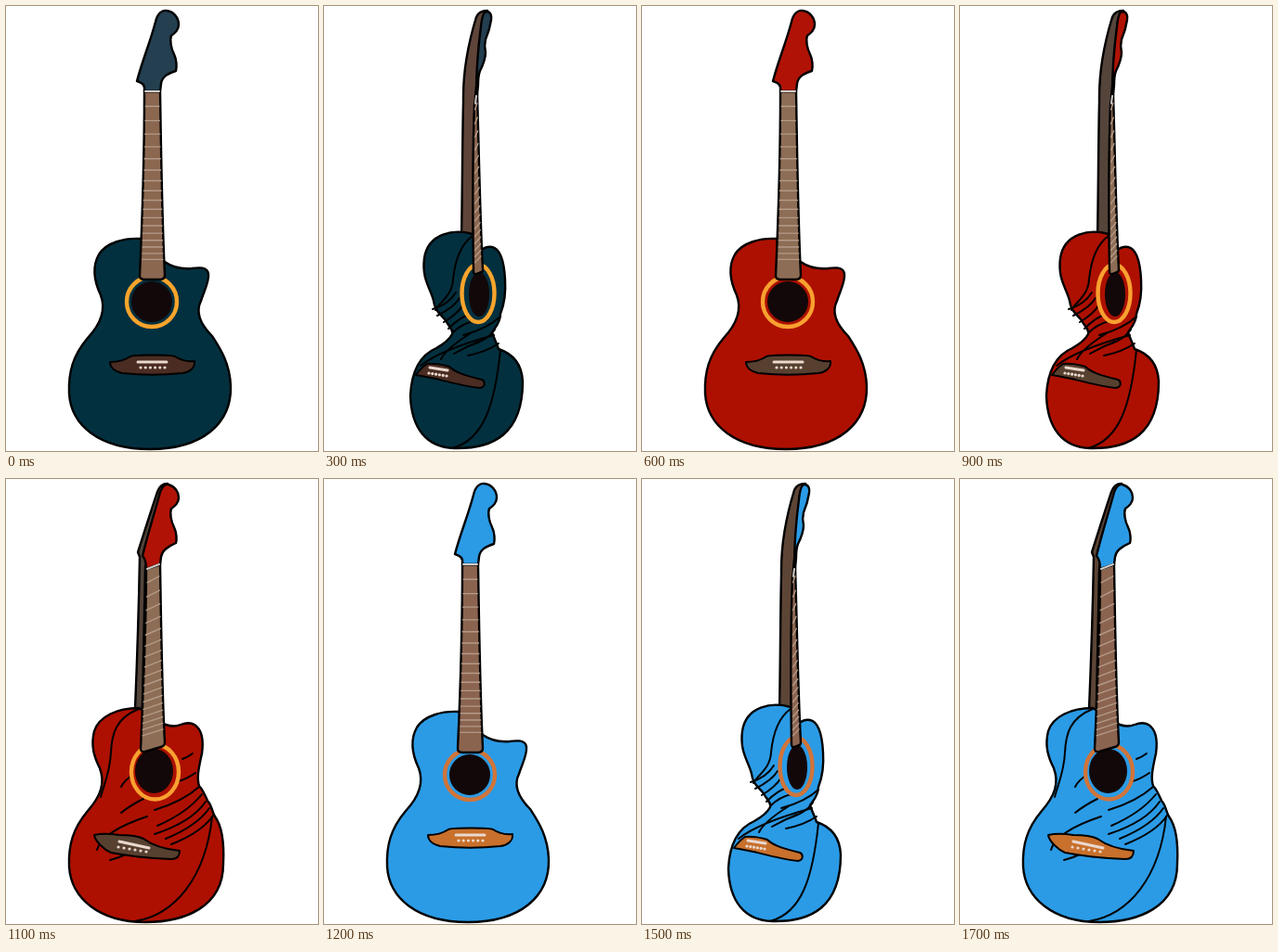
Recreate the animation shown at these times as an HTML page with a canvas. Size 336 by 480 pixels, loop 1800 ms.

```html
<!DOCTYPE html>
<html lang="en">
<head>
<meta charset="utf-8">
<title>Twisting guitar</title>
<style>
  html, body { margin: 0; width: 336px; height: 480px; overflow: hidden; background: #fff; }
  canvas { display: block; }
</style>
</head>
<body>
<canvas id="stage" width="336" height="480"></canvas>
<script>
const ctx = document.getElementById('stage').getContext('2d');
const STEP = 100, STEPS = 6;

const skins = [
  { body: '#03303f', head: '#233f50', ring: '#f9a42c', bridge: '#4a2c22', neck: '#8b6750', side: '#5f4539' },
  { body: '#ad1000', head: '#b01305', ring: '#f9a030', bridge: '#57402f', neck: '#8d6d55', side: '#54443a' },
  { body: '#2b9be6', head: '#2b9be6', ring: '#d0743a', bridge: '#c8702c', neck: '#8b6450', side: '#5d4536' }
];

const front = {
  side: '',
  body: 'M145 251 C128 250 108 255 100 268 C92 282 95 297 102 312 C108 328 101 344 88 358 C72 377 67 395 68 418 C70 452 100 478 155 478 C212 478 243 450 242 410 C241 385 231 370 222 356 C208 342 204 330 210 318 C214 306 219 297 218 289 C217 281 208 282 200 283 C187 284 178 281 171 276 Z',
  seams: '',
  folds: '',
  head: 'M141 81 C147 58 155 40 161 17 C163 8 168 4 173 5 C181 6 186 13 186 20 C186 26 182 29 178 32 C176 37 178 46 181 52 C184 58 184 66 183 70 C174 73 168 76 167 84 L166 92 L149 92 C150 85 147 83 141 81 Z',
  neck: 'M149 92 L166 92 C167 160 168 230 171 290 Q171 295 166 295 L149 295 Q144 295 144 291 C147 225 149 160 149 92 Z',
  nut: '150 92 165 92',
  frets: '149 166 145 171 0',
  ring: '157 319 27 27',
  hole: '157 319 22 22',
  bridge: 'M112 384 C122 384 128 382 134 378 C138 376 178 376 182 378 C188 382 194 384 203 383 C204 390 198 395 190 396 C170 398 145 398 125 396 C116 394 112 389 112 384 Z',
  saddle: '142 384 173 384',
  pins: '145 390 171 390'
};

const turned = {
  side: 'M139 248 C141 200 143 140 144 84 L142 79 C149 57 155 38 163 14 C165 8 169 5 174 5 L166 32 L150 95 L146 290 Z',
  body: 'M143 247 C120 247 100 256 95 272 C91 288 95 300 101 312 C107 328 102 342 88 358 C72 377 67 395 68 418 C70 452 100 478 150 478 C192 478 234 462 234 415 C235 395 233 375 225 364 C222 360 222 352 217 347 C214 340 212 335 208 331 C205 322 208 310 211 296 C213 282 212 271 203 265 C198 262 193 263 188 265 C183 267 178 267 172 265 Z',
  seams: 'M143 248 C118 258 114 275 113 295 C112 316 106 328 102 343 M139 477 C182 470 215 430 222 364',
  folds: 'M190 302 Q196 300 201 296 M183 327 Q194 324 204 317 M160 357 Q190 348 208 332 M163 374 Q195 360 211 340 M160 383 Q200 370 215 348 M172 388 Q206 374 219 355 M178 394 Q211 381 223 363 M124 360 Q134 352 148 345 M124 332 Q128 324 140 317 M98 400 Q104 380 152 364 M112 411 Q121 409 131 404',
  head: 'M147 83 C153 58 159 40 165 18 C167 9 171 5 175 6 C182 8 186 14 186 20 C186 26 182 29 178 32 C176 37 178 46 181 52 C184 58 184 66 183 69 C174 73 168 77 167 84 L166 92 L151 97 C151 90 150 86 147 83 Z',
  neck: 'M151 97 L166 92 C167 160 168 230 171 284 Q171 288 167 289 L150 294 Q145 295 145 291 C148 225 151 160 151 97 Z',
  nut: '152 97 165 92',
  frets: '151 166 145 171 3.5',
  ring: '160.5 316 25.5 29.5',
  hole: '159.5 315 20.5 24',
  bridge: 'M95 384 C104 382 115 383 122 384 C132 384 142 385 148 388 C156 394 168 399 187 401 C187 407 184 410 178 410 C155 409 128 406 113 403 C106 400 96 391 95 384 Z',
  saddle: '122 391 154 398',
  pins: '121 397 151 402'
};

const twisted = {
  side: 'M148 250 C149 200 149 140 150 104 L150 98 C150 68 156 38 164 12 C166 7 170 5 176 5 L170 30 L163 97 L161 285 Z',
  body: 'M160 246 C140 240 112 245 108 272 C105 295 115 305 118 318 C119 328 125 332 130 338 C134 345 140 350 138 354 C135 360 128 365 121 369 C100 378 94 400 93 420 C94 455 110 476 140 477 C182 478 214 462 214 405 C213 385 203 375 188 370 C186 364 183 358 181 352 C184 347 190 342 190 332 C194 322 196 310 195 295 C194 275 190 262 181 260 C176 259 172 261 168 264 Z',
  seams: 'M160 248 C146 258 141 275 139 295 C138 312 126 318 120 328 M138 477 C172 468 184 430 190 371',
  folds: 'M117 327 Q134 322 142 309 M122 334 Q140 325 146 315 M129 341 Q144 332 150 322 M134 348 Q146 336 156 333 M139 352 Q148 343 161 340 M150 355 Q176 348 190 335 M155 367 Q176 361 184 349 M155 377 Q175 373 188 364 M126 381 Q132 369 158 353 M104 388 Q125 371 183 355 M140 375 Q152 368 167 362',
  head: 'M164 94 C164 70 166 45 169 22 C170 12 172 6 175 6 C179 6 181 10 180 15 C179 22 177 29 174 36 C173 40 173 46 174 50 C174 56 171 64 168 70 C166 75 166 80 166 85 L165 96 L163 104 C163 100 163 97 164 94 Z',
  neck: 'M162 106 L165 95 C167 160 168 230 171 284 Q171 287 169 287 L164 289 Q161 290 161 286 C160 225 160 160 162 106 Z',
  nut: '163 105 164 97',
  frets: '161 166 161 171 3.5',
  ring: '166 310 17.5 31',
  hole: '167 311 11 24',
  bridge: 'M99 398 C102 394 106 389 111 386 C118 385 130 387 135 389 C141 395 150 398 170 403 C174 405 174 411 168 412 C155 411 140 407 120 402 C110 400 104 399 99 398 Z',
  saddle: '114 390 133 393',
  pins: '113 396 132 399'
};

const nums = s => s.match(/-?[\d.]+/g).map(Number);

function mix(a, b, k) {
  const out = {};
  for (const part in a) {
    const to = nums(b[part]);
    let i = 0;
    out[part] = a[part].replace(/-?[\d.]+/g, n => +n + (to[i++] - n) * k);
  }
  return out;
}

const half = mix(turned, twisted, 0.5);
const poses = [front, turned, half, twisted, half, turned];

function shape(d, fill, width = 2.4) {
  const p = new Path2D(d);
  if (fill) {
    ctx.fillStyle = fill;
    ctx.fill(p);
  }
  ctx.strokeStyle = '#000';
  ctx.lineWidth = width;
  ctx.stroke(p);
}

function line(x1, y1, x2, y2, color, width) {
  ctx.strokeStyle = color;
  ctx.lineWidth = width;
  ctx.beginPath();
  ctx.moveTo(x1, y1);
  ctx.lineTo(x2, y2);
  ctx.stroke();
}

function oval(spec) {
  const [x, y, rx, ry] = nums(spec);
  ctx.beginPath();
  ctx.ellipse(x, y, rx, ry, 0, 0, Math.PI * 2);
}

function drawFrets(spec) {
  const [l0, r0, l1, r1, slant] = nums(spec);
  for (let n = 1; n <= 17; n++) {
    const y = 92 + 290 * (1 - 2 ** (-n / 12));
    const k = (y - 92) / 200;
    line(l0 + (l1 - l0) * k + 1.5, y + slant, r0 + (r1 - r0) * k - 1.5, y - slant, '#b39a88', 1.4);
  }
}

function drawBridge(pose, skin) {
  shape(pose.bridge, skin.bridge, 2);
  line(...nums(pose.saddle), '#ead8ce', 3);
  const [x1, y1, x2, y2] = nums(pose.pins);
  ctx.fillStyle = '#ead8ce';
  for (let i = 0; i < 6; i++) {
    ctx.beginPath();
    ctx.arc(x1 + (x2 - x1) * i / 5, y1 + (y2 - y1) * i / 5, 1.6, 0, Math.PI * 2);
    ctx.fill();
  }
}

function draw(pose, skin) {
  ctx.fillStyle = '#fff';
  ctx.fillRect(0, 0, 336, 480);
  ctx.lineCap = ctx.lineJoin = 'round';

  shape(pose.side, skin.side);
  shape(pose.body, skin.body);
  shape(pose.seams, null, 2);
  shape(pose.folds, null, 2);

  oval(pose.ring);
  ctx.fillStyle = skin.body;
  ctx.fill();
  ctx.strokeStyle = skin.ring;
  ctx.lineWidth = 4.4;
  ctx.stroke();
  oval(pose.hole);
  ctx.fillStyle = '#120809';
  ctx.fill();

  drawBridge(pose, skin);
  shape(pose.neck, skin.neck);
  drawFrets(pose.frets);
  shape(pose.head, skin.head);
  line(...nums(pose.nut), '#d0cdca', 2);
}

let last = -1;
const start = performance.now();

function tick(now) {
  const step = Math.floor(Math.max(0, now - start) / STEP) % (STEPS * skins.length);
  if (step !== last) {
    draw(poses[step % STEPS], skins[Math.floor(step / STEPS)]);
    last = step;
  }
  requestAnimationFrame(tick);
}
tick(start);
</script>
</body>
</html>
```
